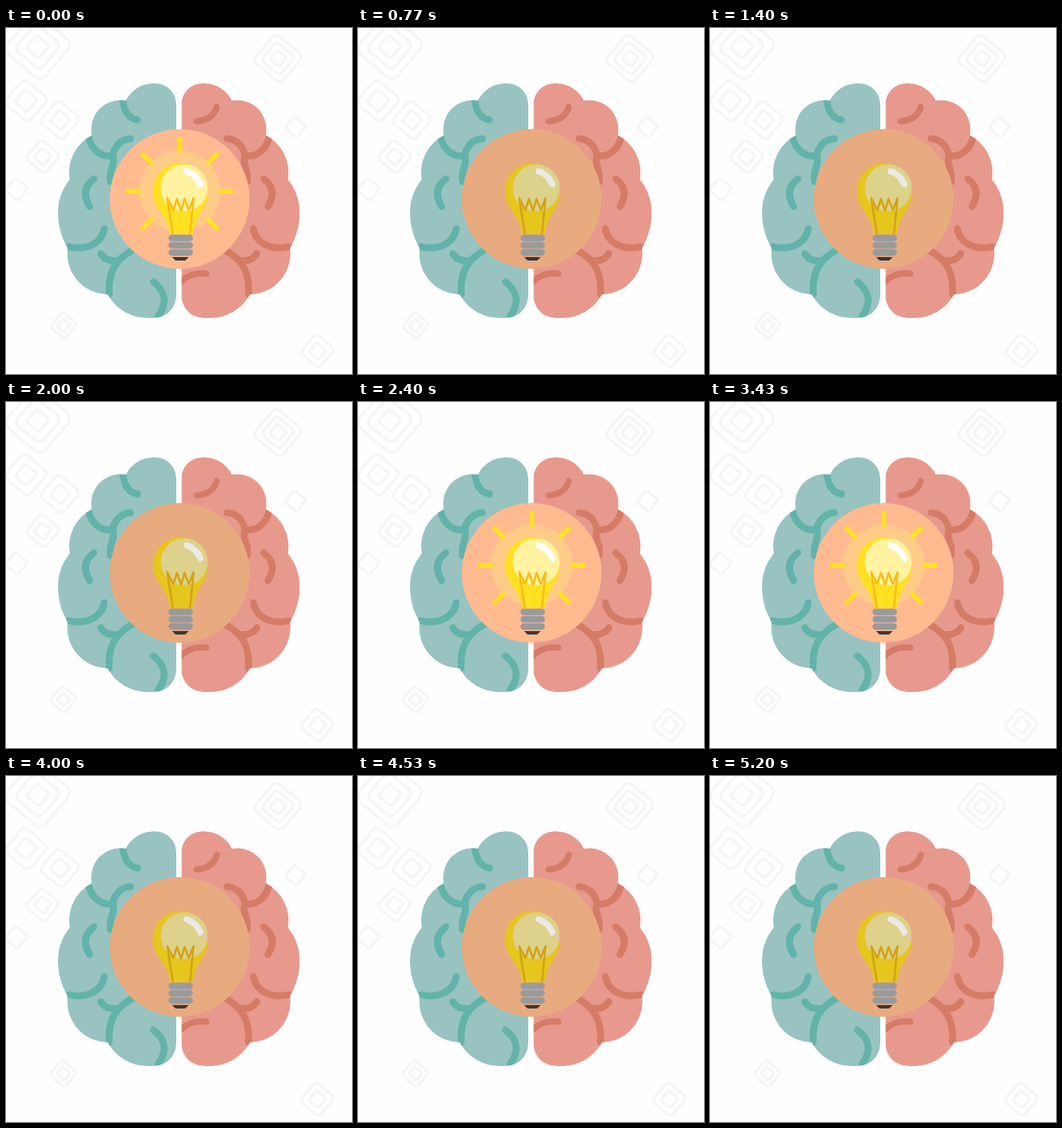
An HTML page that plays this animation: 500x500 px, repeating every 5.23 s.

```html
<!DOCTYPE html>
<html lang="en">
<head>
<meta charset="utf-8">
<title>Bright idea</title>
<style>
  html, body { margin: 0; width: 100%; height: 100%; overflow: hidden; background: #fefefe; }
  svg {
    display: block; width: 100vw; height: 100vh;
    --disc: #e8ab80; --bulb: #e6c51d; --glass: #dcd28b; --wire: #d3a317; --shine: #ece9e4;
  }
  svg.lit { --disc: #ffba90; --bulb: #ffe022; --glass: #fff2a0; --wire: #fabd14; --shine: #fff; }
  .glow { visibility: hidden; }
  .lit .glow { visibility: visible; }
  .line { fill: none; stroke-linecap: round; stroke-linejoin: round; }
</style>
</head>
<body>
<svg id="scene" class="lit" viewBox="0 0 500 500">
  <defs>
    <!-- One arc per lobe, from the top inner corner round to the bottom -->
    <path id="half" d="M246 110A30 30 0 0 0 216 80H213A44 44 0 0 0 173 105A42 42 0 0 0 124 155A60 60 0 0 0 92 219A76 76 0 0 0 75 267A100 100 0 0 0 89 318A59 59 0 0 0 147 385A64 64 0 0 0 206 419H214A32 32 0 0 0 246 387Z"/>
    <clipPath id="inside"><use href="#half"/></clipPath>
    <g id="folds">
      <path d="M119 155C122 177 140 188 154 184C158 168 168 161 180 160M154 184C159 199 148 203 151 222"/>
      <path d="M127 218Q106 234 121 258"/>
      <path d="M91 316C115 322 138 312 142 290"/>
      <path d="M149 385C147 352 159 334 183 321M137 326Q144 338 162 336"/>
    </g>
  </defs>

  <g id="pattern" fill="none" stroke="#f5f5f6"></g>

  <g clip-path="url(#inside)">
    <use href="#half" fill="#98c3c0"/>
    <g class="line" stroke="#62b3aa" stroke-width="10">
      <use href="#folds"/>
      <path d="M169 105Q172 130 190 133M213 367Q240 388 220 416"/>
    </g>
  </g>
  <g transform="matrix(-1 0 0 1 499.5 0)" clip-path="url(#inside)">
    <use href="#half" fill="#e8998d"/>
    <g class="line" stroke="#d57c67" stroke-width="9">
      <use href="#folds" stroke-width="10"/>
      <path d="M195 114Q200 133 224 135M210 355Q232 352 247 367"/>
    </g>
  </g>

  <circle cx="251" cy="247" r="101" fill="var(--disc)"/>
  <g class="glow">
    <circle cx="251" cy="236" r="59" fill="#ffcb88"/>
    <g id="rays" stroke="#ffe326" stroke-width="7"></g>
  </g>

  <path fill="var(--bulb)" d="M237 298C234 268 212 262 212 235A40 40 0 0 1 292 235C292 262 273 268 270 298Z"/>
  <circle cx="257.5" cy="231" r="34" fill="var(--glass)"/>
  <path class="line" stroke="var(--wire)" stroke-width="3" d="M241 297L233 246L242 263L247 247L253 264L258 247L264 263L271 246L266 297"/>
  <path class="line" stroke="var(--shine)" stroke-width="9" d="M261 207Q275 212 281 226"/>
  <path class="line" stroke="#9a9a9b" stroke-width="9.5" d="M239.5 303.5h26m-26 10.5h26m-26 10.5h26"/>
  <path fill="#3b3739" d="M240 331H264L259 336H245Z"/>
</svg>
<script>
  const LOOP = 5230, BLINK = LOOP / 5, LIT = 325;
  const scene = document.getElementById('scene');
  const fill = (id, parts) => document.getElementById(id).innerHTML = parts.join('');

  // Rays every 45 degrees, except straight down where the bulb's base is
  fill('rays', [-3, -2, -1, 0, 1, 2, 3].map(k =>
    `<path d="M251 158v22" transform="rotate(${45 * k} 251 236)"/>`));

  // Faint backdrop squares (x, y, half width): larger ones hold more nested rings
  function nested([x, y, size]) {
    const rings = Math.ceil(size / 12);
    return Array.from({ length: rings }, (_, i) => {
      const r = size * (1 - i / rings);
      return `<rect x="${x - r}" y="${y - r}" width="${2 * r}" height="${2 * r}" rx="${r / 3}"
        stroke-width="4" transform="rotate(40 ${x} ${y})"/>`;
    }).join('');
  }
  fill('pattern', [
    [46, 27, 36], [29, 105, 23], [78, 133, 21], [53, 186, 18], [15, 233, 12],
    [393, 44, 26], [418, 143, 11], [83, 430, 14], [450, 467, 18]
  ].map(nested));

  function draw() {
    const t = performance.now() % LOOP;
    scene.classList.toggle('lit', t % BLINK < LIT);
    requestAnimationFrame(draw);
  }
  draw();
</script>
</body>
</html>
```
